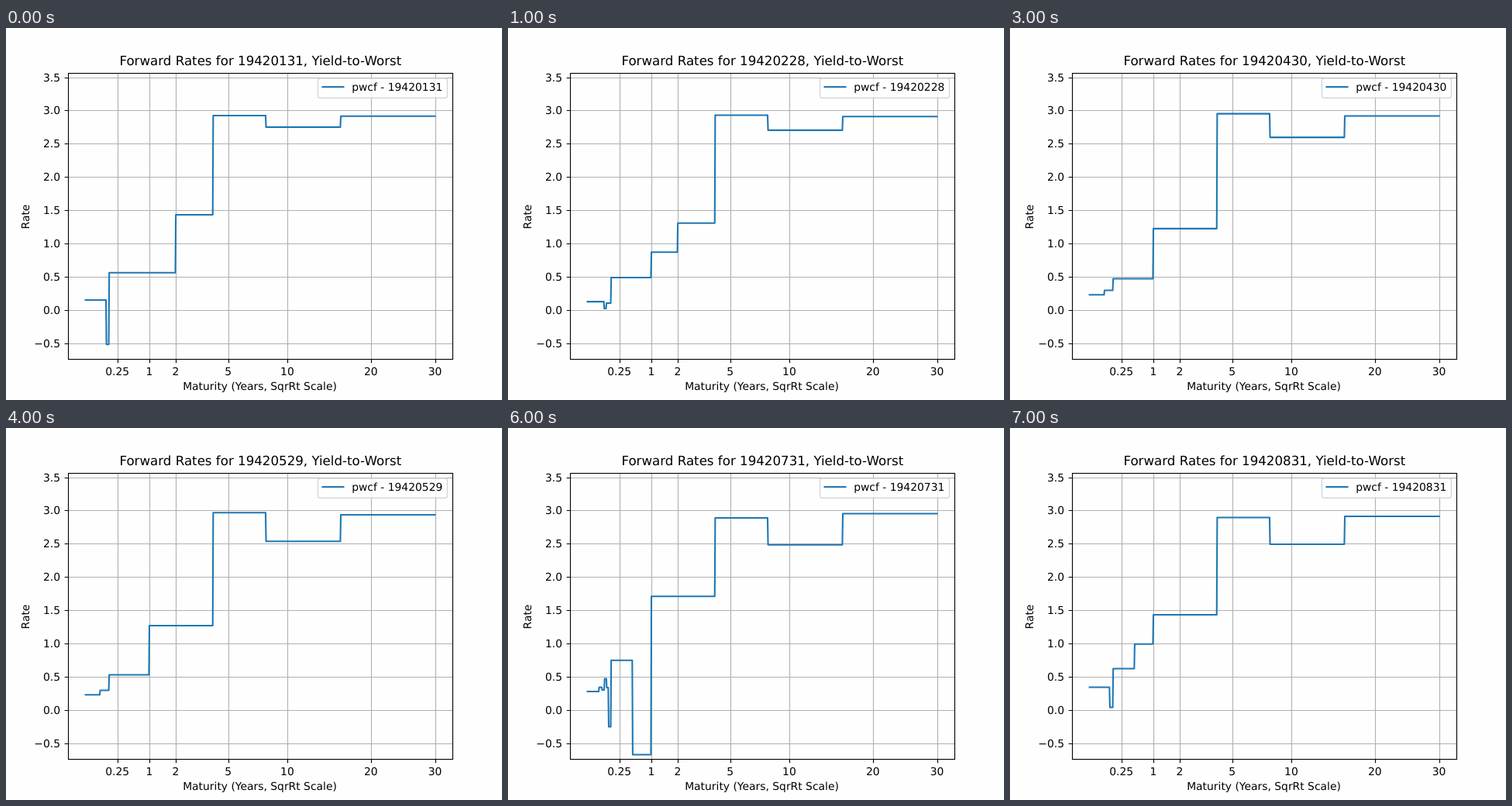
An HTML page that plays this animation: 640x480 px, repeating every 8000 ms.

```html
<!DOCTYPE html>
<html lang="en">
<head>
<meta charset="utf-8">
<title>Forward Rates</title>
<style>
html, body { margin: 0; width: 100%; height: 100%; overflow: hidden; background: #fefefe; }
svg { display: block; }
text { font: 13.89px "DejaVu Sans", sans-serif; text-rendering: geometricPrecision; }
.title { font-size: 16.67px; }
.mid { text-anchor: middle; }
.end { text-anchor: end; }
path, rect { fill: none; stroke-width: 1.11; }
.grid { stroke: #b0b0b0; }
.axis { stroke: #000; }
.line { stroke: #1f77b4; stroke-width: 2.08; stroke-linecap: square; stroke-linejoin: round; }
.legend { fill: #fff; fill-opacity: .8; stroke: #ccc; stroke-opacity: .8; stroke-width: 1.39; }
</style>
</head>
<body>
<svg width="640" height="480" viewBox="0 0 640 480">
  <path id="grid" class="grid"/>
  <path id="ticks" class="axis"/>
  <path id="curve" class="line"/>
  <rect class="axis" x="80.5" y="58.5" width="496" height="369"/>
  <g id="labels"></g>
  <text class="mid" x="327.5" y="467">Maturity (Years, SqrRt Scale)</text>
  <text class="mid" transform="translate(30 243.5) rotate(-90)">Rate</text>
  <text id="title" class="title mid" x="328.3" y="48"></text>
  <rect class="legend" x="402.5" y="65" width="167" height="25.3" rx="2.8"/>
  <path class="line" d="M408.5 76H435.5"/>
  <text id="key" x="446.2" y="81"></text>
</svg>
<script>
const $ = id => document.getElementById(id);
const xOf = years => 102.6 + 82.33 * Math.sqrt(years);
const yOf = rate => 364.3 - 85.8 * rate;

// Key months. Bill rates change weekly from the given week on;
// bond rates hold up to maturities that double from half a year.
const keyMonths = {
  0: { week: 5, bills: [.155, -.512], bonds: [.566, .566, .566, 1.437, 2.929, 2.756, 2.921] },
  2: { week: 3, bills: [.13, .027, .108], bonds: [.42, .42, 1.185, 1.185, 2.941, 2.661, 2.906] },
  4: { week: 2, bills: [.233, .3], bonds: [.533, .533, 1.273, 1.273, 2.973, 2.542, 2.94] },
  5: { week: 4, bills: [.272, .4, -.39], bonds: [1.076, -.523, 1.544, 1.544, 2.83, 2.652, 2.868] },
  6: { week: 1, bills: [.283, .348, .307, .476, .341, -.248],
       bonds: [.752, -.666, 1.714, 1.714, 2.894, 2.488, 2.958] },
  7: { week: 5, bills: [.347, .045], bonds: [.627, .997, 1.437, 1.437, 2.899, 2.498, 2.918] }
};

// Months in between take the mean bond rates of their neighbours.
function ratesFor(month) {
  if (keyMonths[month]) return keyMonths[month];
  const before = keyMonths[month - 1], after = keyMonths[month + 1];
  return { ...after, bonds: after.bonds.map((rate, i) => (rate + before.bonds[i]) / 2) };
}

// Last trading day; a Sunday month end moves back to Friday.
function monthEnd(month) {
  const date = new Date(Date.UTC(1942, month + 1, 0));
  if (date.getUTCDay() === 0) date.setUTCDate(date.getUTCDate() - 2);
  return date;
}

function curvePath(month, date) {
  const { week, bills, bonds } = ratesFor(month);
  const toWednesday = (10 - date.getUTCDay()) % 7;
  const steps = bills.map((rate, i) => {
    const days = i < bills.length - 1 ? toWednesday + 7 * (week + i) : 50;
    return [xOf(days / 365), yOf(rate)];
  });
  bonds.forEach((rate, i) => steps.push([xOf(Math.min(2 ** (i - 1), 30)), yOf(rate)]));
  let d = `M${xOf(0)} ${steps[0][1]}`;
  steps.forEach(([x, y], i) => {
    const next = steps[i + 1];
    d += next ? `L${x - 0.5} ${y}L${x + 0.1} ${next[1]}` : `H${x}`;
  });
  return d;
}

function drawAxes() {
  let grid = "", ticks = "", labels = "";
  for (const years of [0.25, 1, 2, 5, 10, 20, 30]) {
    const x = Math.round(xOf(years)) + 0.5;
    grid += `M${x} 58V427`;
    ticks += `M${x} 427.5v4.86`;
    labels += `<text class="mid" x="${xOf(years)}" y="448">${years}</text>`;
  }
  for (let rate = -0.5; rate <= 3.5; rate += 0.5) {
    const row = Math.floor(yOf(rate) + 0.05);
    grid += `M80 ${row + 0.5}H576`;
    ticks += `M80.5 ${row + 0.5}h-4.86`;
    labels += `<text class="end" x="70" y="${row + 5}">${rate.toFixed(1).replace("-", "\u2212")}</text>`;
  }
  $("grid").setAttribute("d", grid);
  $("ticks").setAttribute("d", ticks);
  $("labels").innerHTML = labels;
}

let shown = -1;
function draw(now) {
  const month = Math.floor(now / 1000) % 8;
  if (month !== shown) {
    shown = month;
    const date = monthEnd(month);
    const stamp = date.toISOString().slice(0, 10).replaceAll("-", "");
    $("curve").setAttribute("d", curvePath(month, date));
    $("title").textContent = `Forward Rates for ${stamp}, Yield-to-Worst`;
    $("key").textContent = `pwcf - ${stamp}`;
  }
  requestAnimationFrame(draw);
}
drawAxes();
draw(performance.now());
</script>
</body>
</html>
```
